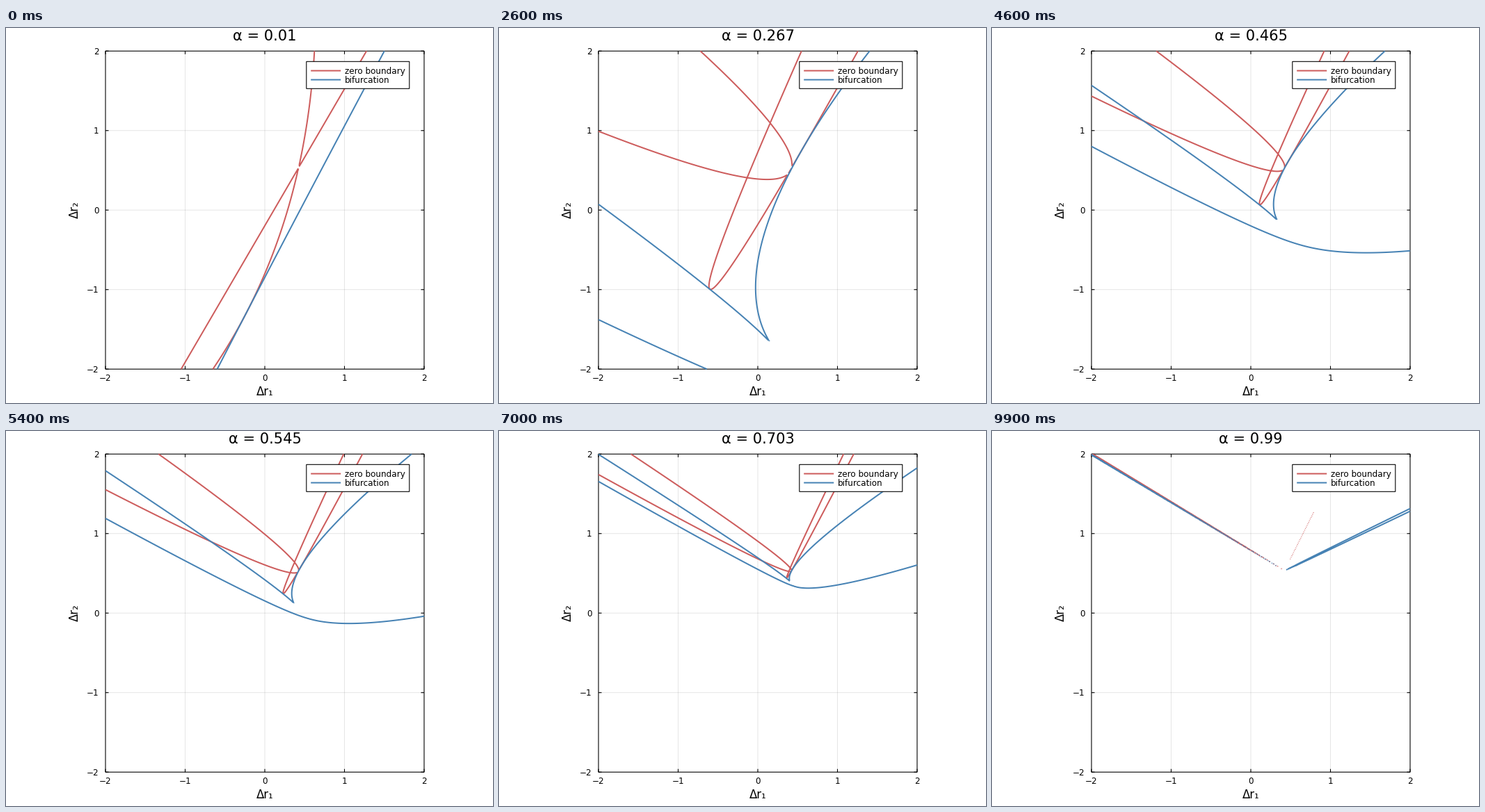
These frames come from a looping animation (700 px wide and 540 px high, 10000 ms). A matplotlib script:

```python
import numpy as np
import matplotlib.pyplot as plt
from matplotlib.animation import FuncAnimation
from matplotlib.collections import LineCollection
from matplotlib.patches import Rectangle

W, H, DPI = 700, 540, 100
FRAMES = 100
PX = 72 / DPI                     # one pixel in points
LEFT, TOP, SIDE = 143, 33.2, 458  # plot box in pixels
RED, BLUE = "indianred", "steelblue"

plt.rcParams["font.family"] = "DejaVu Sans"

# Growth rates as a quadratic map of two abundances (x, y):
# r = U1 x + U2 y + V1 x^2 + W12 x y + V2 y^2, measured from ORIGIN
ORIGIN = (0.4238, 0.5325)
SLOPE1, LIN1, QUAD1 = -0.607, 0.196, -4.36
SLOPE2, LIN2, QUAD2 = 0.4988, 12.1, 48
U1 = (LIN1, 1 + SLOPE1 * LIN1)
V1 = (QUAD1, SLOPE1 * QUAD1)
U2 = ((1 + SLOPE2 * LIN2) / 7, LIN2 / 7)
V2 = (SLOPE2 * QUAD2 / 49, QUAD2 / 49)
W12 = (3.78, -1.925)

axis = np.linspace(-2, 2, 400)
GX, GY = np.meshgrid(axis, axis)


def px(x):
    return LEFT + (x + 2) * SIDE / 4


def py(y):
    return TOP + (2 - y) * SIDE / 4


def zero_boundary(k):
    """Product of the two parabolas where one abundance vanishes."""
    x, y = GX - ORIGIN[0], GY - ORIGIN[1]
    s = y - SLOPE1 * x
    t = x - SLOPE2 * y
    first = k * (x - LIN1 * s) - QUAD1 * s ** 2
    second = k * (y - LIN2 * t) - QUAD2 * t ** 2
    return first * second


def conic_det(m):
    a, b, c, f, g, h = m
    return a * b * c + 2 * f * g * h - a * f ** 2 - b * g ** 2 - c * h ** 2


def bifurcation(k):
    """Discriminant of the conic pencil: zero where two equilibria merge."""
    q = ((GX - ORIGIN[0]) / k, (GY - ORIGIN[1]) / k)
    A, B = ((V1[i], V2[i], -q[i], U2[i] / 2, U1[i] / 2, W12[i] / 2)
            for i in (0, 1))
    plus = conic_det([a + b for a, b in zip(A, B)])
    minus = conic_det([a - b for a, b in zip(A, B)])
    c0, c3 = conic_det(A), conic_det(B)
    c1 = (plus - minus) / 2 - c3
    c2 = (plus + minus) / 2 - c0
    d = (c1 ** 2 * c2 ** 2 - 4 * c0 * c2 ** 3 - 4 * c1 ** 3 * c3
         + 18 * c0 * c1 * c2 * c3 - 27 * c0 ** 2 * c3 ** 2)
    return d / np.abs(d).max()


fig = plt.figure(figsize=(W / DPI, H / DPI), dpi=DPI, facecolor="white")
ax = fig.add_axes([0, 0, 1, 1])
ax.axis("off")


def line(xs, ys, color="black", width=1.1, z=1, **kw):
    ax.plot(xs, ys, color=color, lw=width * PX, zorder=z, snap=False,
            solid_capstyle="butt", **kw)


def label(x, y, s, size, ha="center", z=5, **kw):
    return ax.text(x, y, s, fontsize=size * PX, ha=ha, va="baseline",
                   zorder=z, **kw)


def box(x, y, w, h, z, fill):
    ax.add_patch(Rectangle((x, y), w, h, fc=fill, ec="black", lw=1.1 * PX,
                           zorder=z, snap=False))


right, bottom = LEFT + SIDE, TOP + SIDE
box(LEFT, TOP, SIDE, SIDE, 1, "none")
for v in range(-2, 3):
    x, y = px(v), py(v)
    if abs(v) < 2:
        line([x, x], [TOP, bottom], width=1, z=0, alpha=0.1)
        line([LEFT, right], [y, y], width=1, z=0, alpha=0.1)
    for edge, step in ((TOP, 4.5), (bottom, -4.5)):
        line([x, x], [edge, edge + step])
    for edge, step in ((LEFT, 4.5), (right, -4.5)):
        line([edge, edge + step], [y, y])
    name = str(v).replace("-", "\u2212")
    label(x, 508, name, 12)
    label(133.5, y + 4.5, name, 12, ha="right")

label(372, 529, "Δr₁", 16.5)
label(104, 262, "Δr₂", 16.5, rotation=90, rotation_mode="anchor")
title = label(372, 18.5, "", 21)

box(431.8, 48.3, 148, 39, 6, "white")
for y, color, name in ((61.5, RED, "zero boundary"), (74.5, BLUE, "bifurcation")):
    line([438.2, 481.2], [y, y], color, 2, z=7)
    label(487, y + 4.3, name, 12, ha="left", z=7)

ax.set_xlim(0, W)
ax.set_ylim(H, 0)


def curve(color, z):
    return ax.add_collection(LineCollection(
        [], colors=color, linewidths=2 * PX, zorder=z,
        capstyle="butt", joinstyle="round"), autolim=False)


curves = ((zero_boundary, curve(RED, 2)), (bifurcation, curve(BLUE, 3)))


def level_set(field):
    """Zero contour as open strokes, so tiny loops show as solid dots."""
    cs = ax.contour(px(axis), py(axis), field, levels=[0])
    segments = cs.allsegs[0]
    cs.remove()
    return segments


def update(i):
    alpha = 0.01 + 0.98 * i / (FRAMES - 1)
    k = (1 - alpha) ** 2 / alpha
    title.set_text(f"α = {round(alpha, 3)}")
    for field, art in curves:
        art.set_segments(level_set(field(k)))
    ax.set_xlim(0, W)
    ax.set_ylim(H, 0)
    return [title] + [art for _, art in curves]


anim = FuncAnimation(fig, update, frames=FRAMES, interval=100,
                     repeat=True, repeat_delay=0)
plt.show()
```
